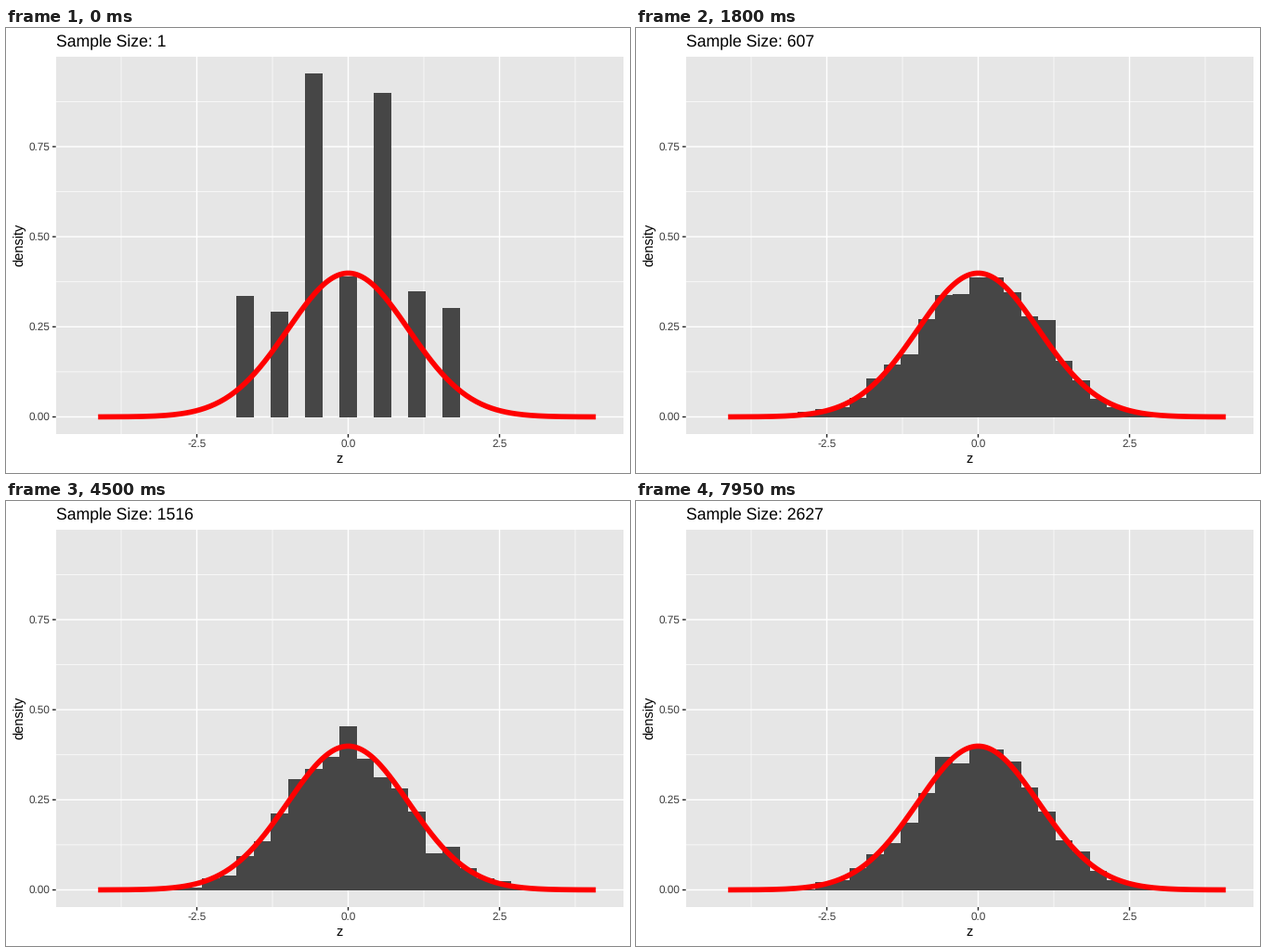
These frames come from a looping animation (672x480 px, 8000 ms). A matplotlib script:

```python
import numpy as np
import matplotlib.pyplot as plt
from matplotlib.animation import FuncAnimation
from matplotlib.lines import Line2D

W, H, DPI = 672, 480, 96
LEFT, RIGHT, TOP, BOTTOM = 53.7, 664.67, 31.0, 438.0
X0, Y0 = 368.5, 419.5            # pixel position of the data origin
X_UNIT, Y_UNIT = 65.2, 388.7     # pixels per data unit
BIN = 18.51 / X_UNIT
BINS = np.arange(-15, 15)
DRAWS = 1000
TICK_MS, STEP_MS, LOOP_MS = 50, 150, 8000
N_STATES = 28

plt.rcParams.update({"font.family": "Liberation Sans", "text.hinting": "none"})
rng = np.random.default_rng(11)


def single_draws():
    """Density for samples of size one: seven values, two bins apart."""
    heights = np.zeros(len(BINS))
    heights[np.abs(BINS) <= 6] = 0
    heights[9:22:2] = 0.335, 0.292, 0.953, 0.391, 0.9, 0.349, 0.302
    return heights


def sample_means():
    """Density of the standardised means of many larger samples."""
    chance = np.exp(-(BINS * BIN) ** 2 / 2)
    return rng.multinomial(DRAWS, chance / chance.sum()) / (DRAWS * BIN)


states = [single_draws()] + [sample_means() for _ in range(N_STATES - 1)]


def px(width):
    return width * 72 / DPI


fig = plt.figure(figsize=(W / DPI, H / DPI), dpi=DPI, facecolor="white")
ax = fig.add_axes([LEFT / W, 1 - BOTTOM / H, (RIGHT - LEFT) / W, (BOTTOM - TOP) / H],
                  facecolor="#E6E6E6", xticks=[], yticks=[])
ax.set_xlim((LEFT - X0) / X_UNIT, (RIGHT - X0) / X_UNIT)
ax.set_ylim((Y0 - BOTTOM) / Y_UNIT, (Y0 - TOP) / Y_UNIT)
for spine in ax.spines.values():
    spine.set_visible(False)


def label(x, y, text, size, color="black", **kwargs):
    # Agg places text about one pixel low, hence the small lift.
    return fig.text(x / W, 1 - (y - 0.7) / H, text, fontsize=size, color=color,
                    va="baseline", rotation_mode="anchor", **kwargs)


def tick_mark(x, y, dx, dy):
    fig.add_artist(Line2D([x / W, (x + dx) / W], [1 - y / H, 1 - (y + dy) / H],
                          color="#262626", lw=px(1.42), snap=False,
                          solid_capstyle="butt"))


def grid(draw_line, positions, width, zorder):
    for position in positions:
        draw_line(position, color="white", lw=px(width), snap=False, zorder=zorder)


TICK_LENGTH = 3.67
X_TICKS, Y_TICKS = np.arange(-2.5, 3, 2.5), np.arange(0, 1, 0.25)
grid(ax.axvline, np.arange(-3.75, 4, 2.5), 0.71, 0.5)
grid(ax.axhline, Y_TICKS + 0.125, 0.71, 0.5)
grid(ax.axvline, X_TICKS, 1.42, 0.6)
grid(ax.axhline, Y_TICKS, 1.42, 0.6)
for value in X_TICKS:
    x = X0 + value * X_UNIT
    tick_mark(x, BOTTOM, 0, TICK_LENGTH)
    label(x, 453.05, f"{value:.1f}", 8.8, "#3D3D3D", ha="center")
for value in Y_TICKS:
    y = Y0 - value * Y_UNIT
    tick_mark(LEFT, y, -TICK_LENGTH, 0)
    label(47, y + 4.2, f"{value:.2f}", 8.8, "#3D3D3D", ha="right")

label((LEFT + RIGHT) / 2, 469.6, "z", 11, ha="center")
label(17.9, (TOP + BOTTOM) / 2, "density", 11, ha="center", rotation=90)
title = label(LEFT, 20, "", 13.2, ha="left")

edges = (np.arange(len(BINS) + 1) + BINS[0] - 0.5) * BIN
bars = ax.stairs(states[0], edges, fill=True, color="#464646", lw=0, zorder=2)
curve_x = np.linspace(-4.13, 4.09, 201)
ax.plot(curve_x, np.exp(-curve_x ** 2 / 2) / np.sqrt(2 * np.pi), color="#FF0000",
        lw=px(5.69), solid_capstyle="butt", zorder=3)


def update(tick):
    # Each state rests for one step, then blends halfway into the next.
    k, blending = divmod(tick * TICK_MS // STEP_MS, 2)
    heights = (states[k] + states[k + 1]) / 2 if blending else states[k]
    bars.set_data(values=heights)
    title.set_text(f"Sample Size: {1 + 101 * k}")
    return bars, title


animation = FuncAnimation(fig, update, frames=LOOP_MS // TICK_MS, interval=TICK_MS,
                          init_func=lambda: update(0), repeat=True, repeat_delay=0)
plt.show()
```
